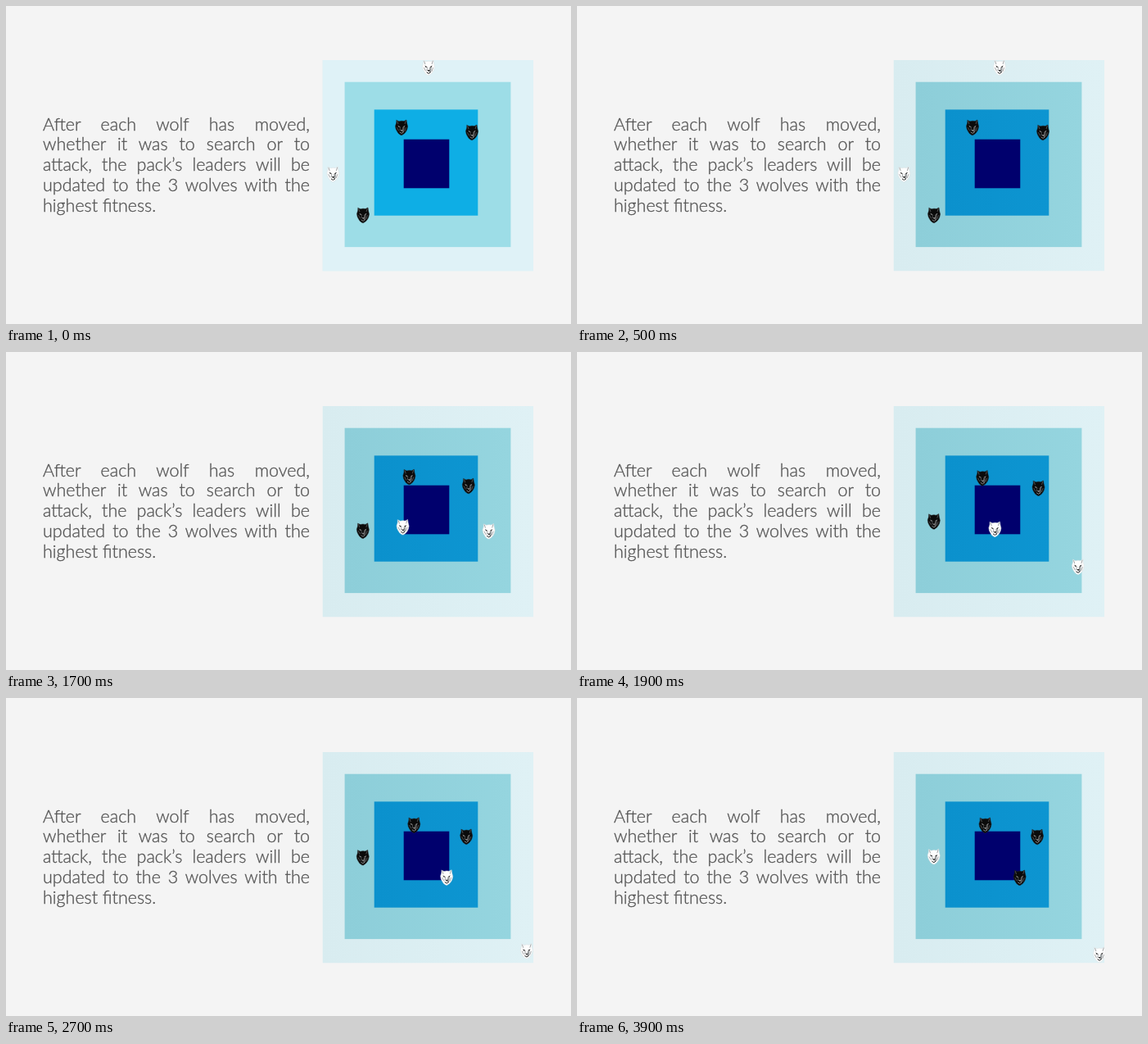
An HTML page that plays this animation: 690x388 px, repeating every 4200 ms.

```html
<!DOCTYPE html>
<html lang="en">
<head>
<meta charset="utf-8">
<style>
  html, body { margin: 0; width: 100%; height: 100%; overflow: hidden; background: #f4f4f4; }
  svg { position: absolute; left: 0; top: 0; }
  #text {
    position: absolute; left: 45px; top: 131.5px; width: 326px;
    font: 300 21.5px/24.75px Lato, sans-serif; color: #555;
    -webkit-text-stroke: .35px #555;
  }
  #text div { height: 24.75px; text-align: justify; text-align-last: justify; }
  #text div:last-child { text-align-last: left; }
  .black { --fur: #0b0b0b; --edge: #222; --shade: #555; --mark: #8a8a8a; }
  .white { --fur: #fdfdfd; --edge: #d5dcde; --shade: #9a9ea0; --mark: #222; }
</style>
</head>
<body>
<div id="text">
  <div>After each wolf has moved,</div>
  <div>whether it was to search or to</div>
  <div>attack, the pack’s leaders will be</div>
  <div>updated to the 3 wolves with the</div>
  <div>highest fitness.</div>
</div>
<svg width="690" height="388" viewBox="0 0 690 388">
  <defs>
    <linearGradient id="outer"><stop stop-color="#d8ecf0"/><stop offset="1" stop-color="#dff1f5"/></linearGradient>
    <linearGradient id="ring"><stop stop-color="#8dced9"/><stop offset="1" stop-color="#95d5df"/></linearGradient>
    <linearGradient id="inner"><stop stop-color="#0b91cd"/><stop offset="1" stop-color="#0d95d1"/></linearGradient>
    <clipPath id="field"><rect x="386.5" y="66" width="257.5" height="257.5"/></clipPath>
    <g id="head" stroke-linejoin="round" stroke-linecap="round">
      <path fill="var(--fur)" stroke="var(--edge)" stroke-width=".5"
        d="M-6-8.6L-3-7.2L0-7.8L3-7.4L6-9L6.6-5L7.6-1L6.8 2.6L5.6 5L3.6 7.6L.6 9.6L-1 9.4L-3.8 7.4L-5.6 4.6L-6.9 2L-7.5-1.5L-6.4-5Z"/>
      <path fill="none" stroke="var(--shade)" stroke-width=".9"
        d="M-5.2-7.4L-4.2-4.2M5.2-7.8L4.2-4.4M-5.4 .6L-3.6 4M5.4 .6L4 4.6M-1.6 0L-2 3.6"/>
      <path fill="var(--shade)" d="M1.2 0L3.6 0L3.4 4L1.8 7.4L.8 4Z"/>
      <path fill="var(--mark)" d="M-4.6-2.4L-1.4-.6L-3.4 .1ZM4.6-2.4L1.4-.6L3.4 .1ZM-1.6 3H1.8L.4 5.2Z"/>
      <path fill="none" stroke="var(--mark)" stroke-width="1" d="M-2 6L.2 7.4L2.4 5.6"/>
    </g>
  </defs>
  <g clip-path="url(#field)">
    <rect x="386.5" y="66" width="257.5" height="257.5" fill="url(#outer)"/>
    <rect x="413.6" y="92.7" width="202.8" height="201.4" fill="url(#ring)"/>
    <rect x="449.7" y="126.4" width="126.6" height="129.3" fill="url(#inner)"/>
    <g id="bright">
      <rect x="386.5" y="66" width="257.5" height="257.5" fill="#dff2f7"/>
      <rect x="413.6" y="92.7" width="202.8" height="201.4" fill="#9ddde7"/>
      <rect x="449.7" y="126.4" width="126.6" height="129.3" fill="#0eaee5"/>
    </g>
    <rect x="485.7" y="162.7" width="55.6" height="59.6" fill="#00006d"/>
    <g id="pack"></g>
  </g>
</svg>
<script>
const LOOP = 4200, STEP = 100, MOVE_START = 1400, RERANK = 3600, DECAY = 0.735;

const wolves = [
  { from: [436, 255], to: [435.7, 193.3], before: 'black', after: 'white' },
  { from: [483, 148], to: [498.5, 155], before: 'black', after: 'black' },
  { from: [569, 154], to: [562, 169.2], before: 'black', after: 'black' },
  { from: [516, 75], to: [638, 313], before: 'white', after: 'white' },
  { from: [399.3, 205], to: [540.7, 219], before: 'white', after: 'black' },
];

const pack = document.getElementById('pack');
const bright = document.getElementById('bright');
for (const wolf of wolves) {
  wolf.node = document.createElementNS(pack.namespaceURI, 'use');
  wolf.node.setAttribute('href', '#head');
  pack.append(wolf.node);
}

function draw(now) {
  const t = Math.floor((now % LOOP) / STEP) * STEP;
  // Each step closes a fixed share of the remaining distance.
  const left = DECAY ** Math.max(0, (t - MOVE_START) / STEP);
  for (const { from, to, before, after, node } of wolves) {
    const [x, y] = to.map((end, i) => end + (from[i] - end) * left);
    node.setAttribute('transform', `translate(${x} ${y})`);
    node.setAttribute('class', t < RERANK ? before : after);
  }
  bright.setAttribute('opacity', t < 400 ? 1 : t < 500 ? 0.5 : 0);
}

function frame() {
  draw(performance.now());
  requestAnimationFrame(frame);
}
frame();
</script>
</body>
</html>
```
